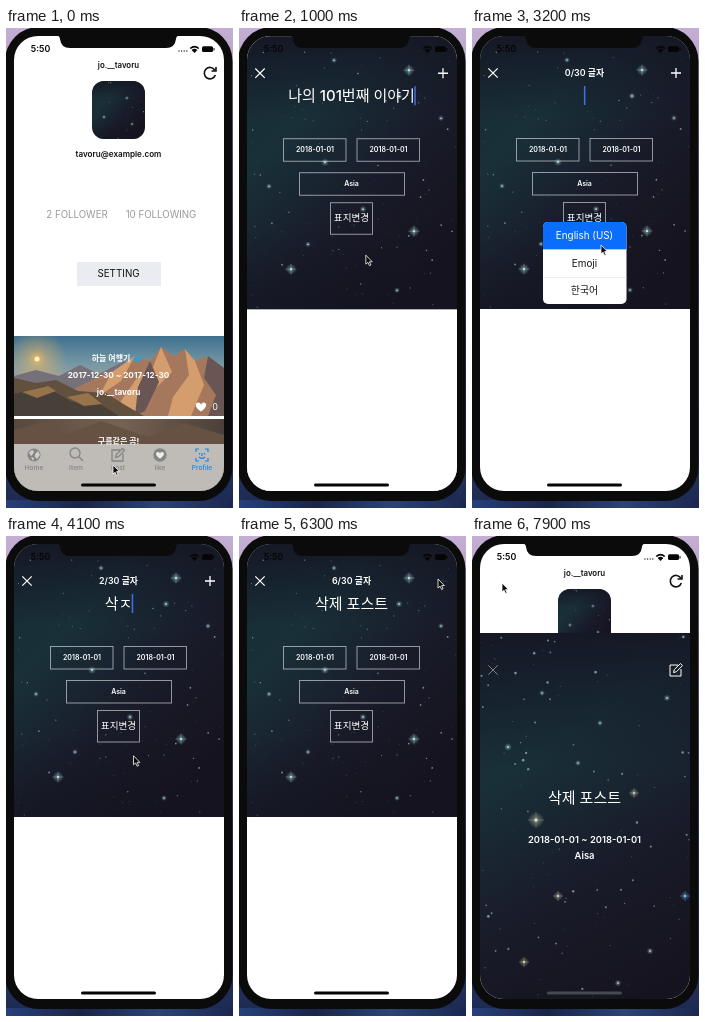
These frames come from a looping animation (227 px wide and 480 px high, 8 s). An HTML page with a canvas:

```html
<!DOCTYPE html>
<html lang="ko">
<head>
<meta charset="utf-8">
<style>
html, body { margin: 0; width: 100%; height: 100%; overflow: hidden; }
canvas { display: block; width: 227px; height: 480px; }
</style>
</head>
<body>
<canvas id="stage"></canvas>
<script>
const canvas = document.getElementById('stage');
const ratio = window.devicePixelRatio || 1;
canvas.width = 227 * ratio;
canvas.height = 480 * ratio;
const c = canvas.getContext('2d');

const LOOP = 8000, STEP = 100, TOP = 8, SCREEN_H = 455, MID = 112.5;
const FONT = 'Inter, "Noto Sans CJK KR", "Noto Sans CJK", sans-serif';
const USER = 'jo.__tavoru', MAIL = 'tavoru@example.com';

// ---------- helpers ----------
function text(s, x, y, size, color = '#000', weight = 400, align = 'center') {
  c.font = `${weight} ${size}px ${FONT}`;
  c.textAlign = align;
  c.textBaseline = 'middle';
  c.fillStyle = color;
  c.fillText(s, x, y);
}
function rect(x, y, w, h, color, r = 0) {
  c.fillStyle = color;
  c.beginPath();
  c.roundRect(x, y, w, h, r);
  c.fill();
}
function frame(x, y, w, h) {
  c.strokeStyle = 'rgba(255,255,255,.6)';
  c.lineWidth = 0.9;
  c.strokeRect(x, y, w, h);
}
function clip(x, y, w, h, r, draw) {
  c.save();
  c.beginPath();
  c.roundRect(x, y, w, h, r);
  c.clip();
  draw();
  c.restore();
}
function dot(x, y, r, color) {
  c.fillStyle = color;
  c.beginPath();
  c.arc(x, y, r, 0, 7);
  c.fill();
}
function icon(d, x, y, { stroke, fill, width = 1.2, scale = 1 }) {
  c.save();
  c.translate(x, y);
  c.scale(scale, scale);
  const p = new Path2D(d);
  if (fill) { c.fillStyle = fill; c.fill(p); }
  if (stroke) { c.strokeStyle = stroke; c.lineWidth = width; c.stroke(p); }
  c.restore();
}
function gradient(x0, y0, x1, y1, ...colors) {
  const g = c.createLinearGradient(x0, y0, x1, y1);
  colors.forEach((col, i) => g.addColorStop(i / (colors.length - 1), col));
  return g;
}
function glow(x, y, r, color) {
  const g = c.createRadialGradient(x, y, 0, x, y, r);
  g.addColorStop(0, `rgba(${color},.85)`);
  g.addColorStop(0.3, `rgba(${color},.4)`);
  g.addColorStop(1, `rgba(${color},0)`);
  dot(x, y, r, g);
}
function randomizer(seed) {
  return () => {
    seed = (seed * 16807) % 2147483647;
    return seed / 2147483647;
  };
}

const CROSS = 'M-4.7-4.7L4.7 4.7M4.7-4.7L-4.7 4.7';
const PLUS = 'M-5 0H5M0-5V5';
const PENCIL = 'M2-5H-6V6H5V-1M-2.5 2.5L-1.7-.5L4.5-6.5L6.5-4.5L.5 1.7Z';
const HEART = 'M0 4.5C-8-1-5-5-2.5-4.5Q-.6-4.2 0-2.4Q.6-4.2 2.5-4.5C5-5 8-1 0 4.5Z';
const POINTER = 'M0 0V9L2.1 7.2L3.6 10.5L5.1 9.8L3.6 6.6H6.4Z';

// ---------- night sky ----------
function sky(x, y, w, h, seed, count, scale, brights) {
  rect(x, y, w, h, gradient(x, y, x + w, y + h * 0.75, '#172b35', '#193039', '#191b29', '#16131f'));
  rect(x, y, w, h * 0.3, gradient(0, y, 0, y + h * 0.3, 'rgba(20,18,32,.75)', 'rgba(20,18,32,0)'));
  rect(x, y + h * 0.7, w, h * 0.3, gradient(0, y + h * 0.7, 0, y + h, 'rgba(18,20,32,0)', 'rgba(18,20,32,.5)'));
  const rnd = randomizer(seed);
  for (let i = 0; i < count; i++) {
    const sx = x + rnd() * w, sy = y + rnd() * h, k = rnd();
    dot(sx, sy, (0.35 + k * k * 0.75) * scale, `rgba(150,185,185,${0.25 + k * 0.5})`);
  }
  for (const [bx, by, r, color = '165,215,215'] of brights) {
    const px = x + bx, py = y + by;
    glow(px, py, r, color);
    dot(px, py, r * 0.2, '#dcebe6');
    if (r > 4) icon(`M${-r} 0H${r}M0 ${-r}V${r}`, px, py, { stroke: `rgba(${color},.55)`, width: 0.6 });
  }
}
const editorStars = [
  [162, 34, 5.5], [152, 60, 3.5], [78, 126, 4], [44, 233, 5.5], [167, 195, 5.5],
  [22, 150, 3], [61, 208, 3], [116, 173, 3.5], [150, 254, 3], [87, 24, 3], [194, 82, 3]
];
const detailStars = [
  [56, 187, 8, '205,195,165'], [78, 263, 5, '190,190,165'], [205, 263, 5, '90,165,220'],
  [154, 160, 4.8, '190,190,165'], [44, 329, 5, '195,190,150'], [28, 114, 4],
  [170, 318, 3.5], [120, 90, 3], [187, 65, 3.5], [98, 130, 3], [138, 350, 3.5], [62, 60, 3]
];

// ---------- profile page ----------
function mountains(y) {
  rect(8, y, 210, 80, gradient(0, y, 0, y + 58, '#3f708f', '#7899a5', '#c9a489'));
  glow(31, y + 23, 30, '255,190,90');
  dot(31, y + 23, 2.5, '#fff3c8');
  icon('M0 40L22 34 45 40 66 29 85 38 110 25 130 36V80H0Z', 8, y, { fill: '#75707a' });
  icon('M60 53L88 39 107 32 121 20 136 25 147 11 160 20 171 13 181 25 194 20 210 32V80H45Z', 8, y, { fill: '#a5785d' });
  icon('M147 11L139 31 123 42 109 62 97 80H125L141 53 158 36ZM171 13L175 39 159 61 154 80H177L190 49 181 25ZM121 20L107 45 85 60 98 36Z', 8, y, { fill: '#d39d6d' });
  icon('M136 25L145 46 131 75 121 80 124 51ZM194 20L190 42 202 59 194 80H210V32Z', 8, y, { fill: '#685554' });
  icon('M0 42L22 47 42 44 64 55 92 57 111 69 130 80H0Z', 8, y, { fill: '#62503f' });
  icon('M0 58L31 50 58 66 80 64 105 80H0Z', 8, y, { fill: '#474038' });
  icon('M8 56L34 50 42 55 23 62ZM53 61L74 57 88 68 70 70Z', 8, y, { fill: '#97734b' });
}
function whale(x, y) {
  icon('M-5 0Q-3-4 1-3Q4-2 5-5L7-3Q6 3 1 4Q-5 4-5 0Z', x, y, { fill: '#4299c4', scale: 0.8 });
}
function tabBar() {
  rect(8, 416, 210, 47, 'rgba(212,210,208,.82)');
  const grey = '#858585', blue = '#1688ee';
  ['Home', 'Item', 'Post', 'like', 'Profile'].forEach((s, i) =>
    text(s, 28 + i * 42, 440, 6.6, i === 4 ? blue : grey, 500));
  dot(28, 427, 6.5, grey);
  icon('M-5-2Q-3-6 0-4L-1-1-3 1ZM1-1L4-4 6 0 3 4 1 2ZM-3 2L0 3-1 6Z', 28, 427, { fill: '#d0cecc' });
  icon('M4-1A5 5 0 1 1-6-1A5 5 0 1 1 4-1M3 3L7 7', 70, 426, { stroke: grey, width: 1.4 });
  icon(PENCIL, 112, 427, { stroke: grey, width: 1.3 });
  dot(154, 427, 6.7, grey);
  icon(HEART, 154, 427.3, { fill: '#eee', scale: 0.75 });
  icon('M-6-3V-6H-3M3-6H6V-3M6 3V6H3M-3 6H-6V3M-2.5-2V-.5M2.5-2V-.5M0-2V1M-3 2Q0 5 3 2', 196, 427, { stroke: blue, width: 1.2 });
}
function profile() {
  rect(8, 8, 210, 455, '#fff');
  text(USER, MID, 38, 7.9, '#111', 600);
  icon('M4.8-3A5.7 5.7 0 1 0 5.4 2M6-6V-2H1.5', 204, 45, { stroke: '#111', width: 1.6 });
  clip(86, 53, 53, 58, 12, () =>
    sky(86, 53, 53, 58, 77, 28, 0.55, [[12, 36, 2.2], [35, 17, 2], [40, 43, 2]]));
  text(MAIL, MID, 127, 8.1, '#111', 600);
  text('2 FOLLOWER', 71, 187, 9.7, '#999');
  text('10 FOLLOWING', 155, 187, 9.7, '#999');
  rect(71, 234, 84, 24, '#ebebf2');
  text('SETTING', MID, 246, 9.8, '#111');

  clip(8, 308, 210, 80, 0, () => mountains(308));
  text('하늘 여행기', 105, 331, 8, '#fff', 700);
  whale(131, 331);
  text('2017-12-30 ~ 2017-12-30', MID, 348, 8.2, '#fff', 700);
  text(USER, MID, 364.5, 8.2, '#fff', 700);
  icon(HEART, 195, 379, { fill: '#fff' });
  text('0', 209, 379, 9, '#fff');

  rect(8, 391, 210, 72, gradient(8, 0, 218, 0, '#57483d', '#776252', '#4b4039'));
  icon('M8 402L38 394 61 406 95 393 142 409 178 395 218 407V463H8Z', 0, 0, { fill: '#665242' });
  text('구름같은 곰!', MID, 414, 8, '#fff', 700);
  tabBar();
}

// ---------- typing ----------
const START = '나의 101번째 이야기';
const edits = [[540, START], [1300, START.slice(0, 11)]];
for (let n = 10; n >= 0; n--) edits.push([1750 + (10 - n) * 95, START.slice(0, n)]);
['ㅅ', '사', '삭', '삭ㅈ', '삭제', '삭제 '].forEach((s, i) => edits.push([3780 + i * 100, s]));
['ㅍ', '포', '포ㅅ', '포스', '포슽', '포스트'].forEach((s, i) => edits.push([5000 + i * 120, '삭제 ' + s]));

function caretAlpha(age) {
  const p = age % 1000;
  if (p < 550) return 1;
  if (p < 700) return (700 - p) / 150;
  return p < 850 ? 0 : (p - 850) / 150;
}

function editor(t) {
  rect(8, 8, 210, SCREEN_H, '#fff');
  sky(8, 8, 210, 273, 4021, 125, 0.85, editorStars);
  icon(CROSS, 21, 45, { stroke: '#fff' });
  const pressed = t >= 6200 && t < 6600;
  icon(PLUS, 204, 45, { stroke: `rgba(255,255,255,${pressed ? 0.05 : 1})`, width: 1.3 });

  const [when, value] = edits.filter(e => e[0] <= t).pop() || edits[0];
  if (t >= 1300) text(`${value.length}/30 글자`, MID, 45, 8.9, '#fff', 600);
  const shown = value.trimEnd();
  text(shown, MID, 68, 15, '#fff', 500);
  const end = MID + c.measureText(shown).width / 2 + c.measureText(value.slice(shown.length)).width;
  if (t < 6100) {
    c.globalAlpha = caretAlpha(t - when);
    rect(end - 0.6, 58, 1.5, 19, '#3f70ee');
    c.globalAlpha = 1;
  }

  frame(44.5, 110.5, 62.5, 22.5);
  frame(118, 110.5, 62.5, 22.5);
  text('2018-01-01', 76, 122, 7, '#fff', 600);
  text('2018-01-01', 149.5, 122, 7, '#fff', 600);
  frame(60.5, 144.5, 105, 22.5);
  text('Asia', MID, 156, 7, '#fff', 600);
  frame(91.5, 174.5, 42, 31.5);
  text('표지변경', MID, 190, 9.6, '#fff');
}

function detail(t) {
  sky(8, 8, 210, SCREEN_H, 913, 130, 1.25, detailStars);
  icon(CROSS, 21, 45, { stroke: `rgba(255,255,255,${t >= 7700 ? 0.45 : 1})`, width: 1 });
  icon(PENCIL, 204, 45, { stroke: '#fff', width: 1 });
  text('삭제 포스트', MID, 173, 15, '#fff', 500);
  text('2018-01-01 ~ 2018-01-01', MID, 215.5, 9.4, '#fff', 600);
  text('Aisa', MID, 231, 9.4, '#fff', 600);
}

function languageMenu(t) {
  const chosen = t < 3400 ? 0 : 2;
  clip(71, 194, 83.5, 82, 5, () => {
    rect(71, 194, 84, 82, '#fff');
    ['English (US)', 'Emoji', '한국어'].forEach((s, i) => {
      const y = 194 + i * 27.5;
      if (i) rect(71, y, 84, 0.6, '#ddd');
      if (i === chosen) rect(71, y, 84, 27.5, '#0a6dfc');
      text(s, MID, y + 14.3, 9.9, i === chosen ? '#fff' : '#111');
    });
  });
}

// ---------- phone ----------
function desktop() {
  rect(0, 0, 227, 480, gradient(0, 0, 0, 480, '#c5aed3', '#8a7fb2', '#3a4675', '#1c2a52'));
  rect(0, 472, 227, 8, gradient(0, 0, 227, 0, '#27407a', '#18254a', '#2b4475', '#1a2850'));
  rect(-1, -1, 227.5, 474, '#0b0b0b', 34);
}
function status() {
  text('5:50', 34.5, 21, 8.8, '#050505', 600);
  for (let i = 0; i < 4; i++) dot(173 + i * 2.6, 23, 0.7, '#222');
  icon('M-4.8-1.6Q0-6 4.8-1.6L3.7-.5Q0-3.7-3.7-.5ZM-2.9.4Q0-2 2.9.4L0 3.4Z', 188.5, 21.5, { fill: '#050505' });
  rect(196, 18.3, 11, 5.8, '#050505', 1.5);
  rect(207.5, 20, 1, 2.4, '#050505');
}
function bezelTop() {
  icon('M50 7H174Q170 8 170 11Q169 20 160 20H64Q55 20 54 11Q54 8 50 7Z', 0, 0, { fill: '#0b0b0b' });
}

const route = [
  [0, 107, 437], [300, 107, 437], [700, 115, 282], [1100, 129, 217], [4000, 129, 217],
  [4600, 109, 254], [5600, 109, 254], [6200, 199, 43], [6700, 199, 43], [7500, 30, 47], [8000, 30, 47]
];
function pointer(t) {
  const i = route.findIndex(k => k[0] > t);
  const [t0, x0, y0] = route[i - 1], [t1, x1, y1] = route[i];
  const p = (t - t0) / (t1 - t0), k = p * p * (3 - 2 * p);
  icon(POINTER, x0 + (x1 - x0) * k, y0 + (y1 - y0) * k, { fill: '#080808', stroke: '#fff', width: 0.8 });
}

function progress(t, start) {
  const p = Math.min(1, Math.max(0, (t - start) / 500));
  return 1 - (1 - p) ** 3;
}
function sheet(offset, draw) {
  c.save();
  c.translate(0, offset);
  draw();
  c.restore();
}

function render(t) {
  c.setTransform(ratio, 0, 0, ratio, 0, 0);
  desktop();
  const closing = progress(t, 7865);
  const editorIn = progress(t, 540), detailIn = progress(t, 6550);
  clip(8, TOP, 210, SCREEN_H, 24, () => {
    if (editorIn < 1 || closing > 0) profile();
    if (editorIn > 0 && detailIn < 1) sheet((1 - editorIn) * SCREEN_H, () => editor(t));
    if (detailIn > 0) sheet((1 - detailIn + closing) * SCREEN_H, () => detail(t));
    status();
    rect(75, 455.5, 75, 3, detailIn > 0.1 ? '#454950' : '#050505', 1.5);
  });
  bezelTop();
  if (t >= 2900 && t < 3700) languageMenu(t);
  pointer(t);
}

const origin = performance.now();
function tick() {
  const t = (performance.now() - origin) % LOOP;
  render(Math.floor(t / STEP) * STEP);
  requestAnimationFrame(tick);
}
tick();
</script>
</body>
</html>
```
